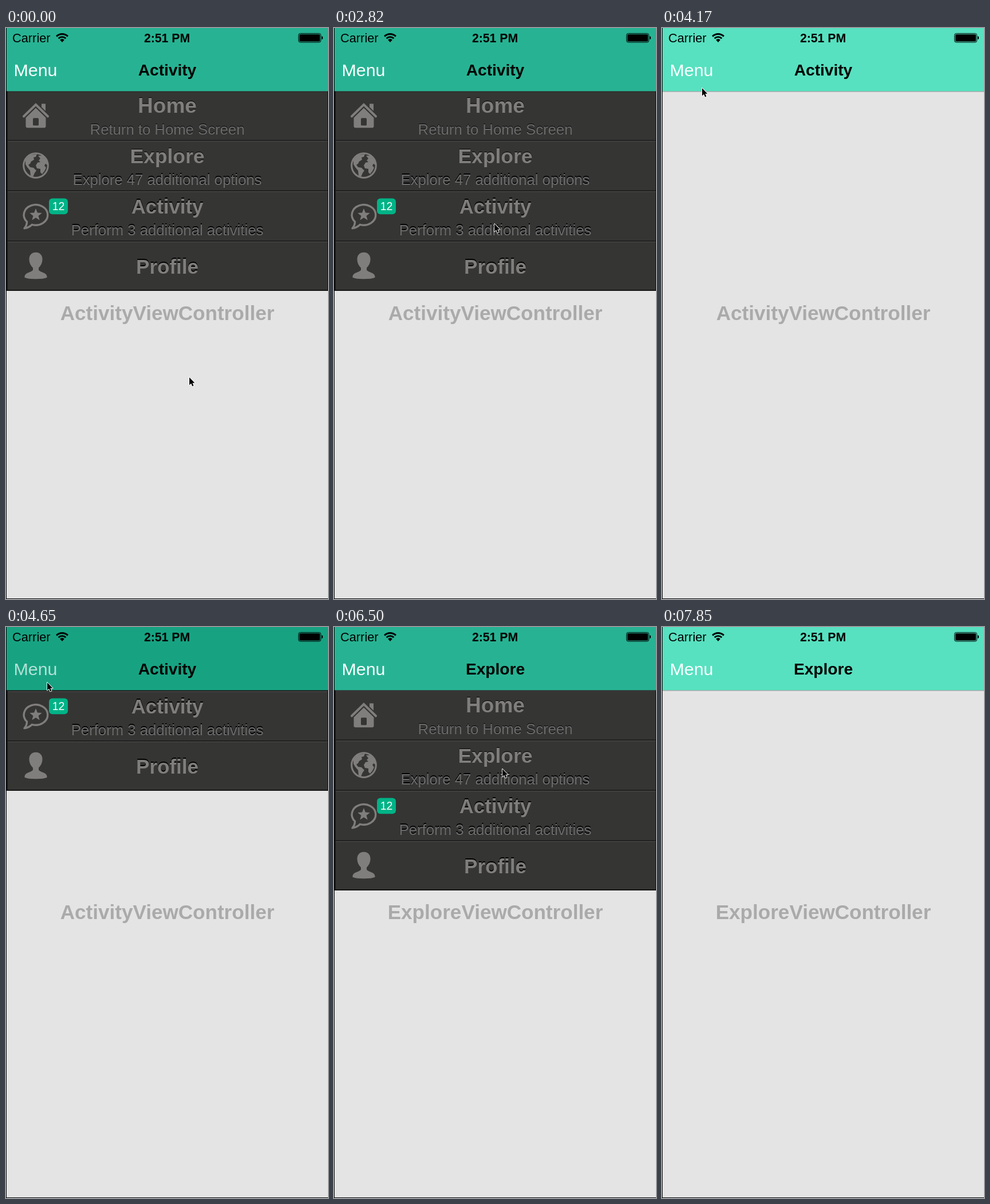
An HTML page with a canvas for the animation above (8270 ms loop, 562 by 997 pixels).

```html
<!DOCTYPE html>
<html lang="en">
<head>
<meta charset="utf-8">
<title>Drop-down menu</title>
<style>
  html, body { margin: 0; width: 100%; height: 100%; overflow: hidden; background: #e4e4e4; }
  canvas { display: block; }
</style>
</head>
<body>
<canvas id="stage" width="562" height="997"></canvas>
<script>
const ctx = document.getElementById('stage').getContext('2d');
const W = 562, H = 997, LOOP = 8270, STEP = 60;
const SANS = '"Liberation Sans", Arial, sans-serif';
const MID = 281.5, NAV = 110.4;
const ROW = 87.8, FIRST = 109.5, BOTTOM = 459;
const HIDDEN = -460, BOUNCE = 36;
const INK = '#807e7c', SLATE = '#353534', DARK = '#1c1c1b';

const BAR_OPEN = [39, 179, 147], BAR_FULL = [23, 163, 130], BAR_CLEAR = [87, 225, 192];

const rows = [
  { title: 'Home', size: 37, sub: 'Return to Home Screen', icon: drawHome },
  { title: 'Explore', size: 35.5, sub: 'Explore 47 additional options', icon: drawGlobe },
  { title: 'Activity', size: 34.8, sub: 'Perform 3 additional activities', icon: drawChat, badge: '12' },
  { title: 'Profile', size: 35, icon: drawPerson }
];

// Pointer stops: time, x, y
const stops = [
  [780, 320, 610], [1620, 279, 344], [1680, 280, 342],
  [3510, 280, 342], [4170, 70, 105], [4290, 71, 94],
  [4590, 71, 94], [4650, 72, 97], [5060, 256, 248],
  [5180, 256, 248], [5360, 270, 262],
  [5480, 270, 262], [5720, 294, 248],
  [7310, 294, 248], [7670, 495, 960]
];
const POINTER_GONE = 7850;

const clamp = v => Math.min(1, Math.max(0, v));
const ease = v => { v = clamp(v); return v * v * (3 - 2 * v); };
const mix = (a, b, v) => a + (b - a) * v;
const snap = (t, from) => from + Math.floor((t - from) / STEP) * STEP;

function rect(x, y, w, h, color) {
  ctx.fillStyle = color;
  ctx.fillRect(x, y, w, h);
}

function roundRect(x, y, w, h, r) {
  ctx.beginPath();
  ctx.roundRect(x, y, w, h, r);
}

function text(str, x, y, size, color, bold, align = 'center') {
  ctx.font = `${bold ? 'bold ' : ''}${size}px ${SANS}`;
  ctx.textAlign = align;
  ctx.fillStyle = color;
  ctx.fillText(str, x, y);
}

function etched(str, y, size, color, bold) {
  text(str, MID, y - 1.5, size, '#000', bold);
  text(str, MID, y, size, color, bold);
}

function fillPath(d, color = INK) {
  ctx.fillStyle = color;
  ctx.fill(new Path2D(d));
}

function drawHome() {
  fillPath('M10-20h7V-6h-7Z');
  fillPath('M-17.5 4L0-13 17.5 4V19q0 3-3 3h-29q-3 0-3-3Z');
  ctx.lineJoin = 'miter';
  ctx.lineCap = 'round';
  for (const [width, color] of [[8, SLATE], [4, INK]]) {
    ctx.lineWidth = width;
    ctx.strokeStyle = color;
    ctx.stroke(new Path2D('M-21 2L0-18.5 21 2'));
  }
  roundRect(-5, 5, 10, 13, 1.5);
  ctx.fillStyle = SLATE;
  ctx.fill();
}

function drawGlobe() {
  ctx.lineWidth = 3;
  ctx.strokeStyle = INK;
  ctx.beginPath();
  ctx.arc(0, 0, 21.3, 0, Math.PI * 2);
  ctx.stroke();
  fillPath('M-18-10L-11-18 2-20 0-15-4-14-3-10-8-7-10-3-13-1-10 3-4 4 1 9-2 13-5 20-9 18-10 9-15 3-18-2Z');
  fillPath('M4-17L12-17 19-9 21 0 17-3 15 0 18 4 15 10 11 15 8 12 8 6 2 5 0 0 3-5 8-6 5-9 8-12Z');
}

function drawChat() {
  ctx.lineWidth = 3.4;
  ctx.lineJoin = 'round';
  ctx.strokeStyle = INK;
  ctx.stroke(new Path2D(
    'M-15.5 10.4A20.8 17.8 0 1 1-6.5 15.4Q-12 21-20 22Q-15.5 17-15.5 10.4Z'));
  ctx.beginPath();
  for (let i = 0; i < 10; i++) {
    const r = i % 2 ? 4.8 : 11.3, a = i * Math.PI / 5 - Math.PI / 2;
    ctx.lineTo(r * Math.cos(a), r * Math.sin(a) - 1.5);
  }
  ctx.fillStyle = INK;
  ctx.fill();
}

function drawPerson() {
  fillPath('M0-24C8-24 12-18 11.5-11C11-4 8 0 5 3V7C8 11 19 11 19.5 18V20Q14 22.5 0 22.5' +
    'T-19.5 20V18C-19 11-8 11-5 7V3C-8 0-11-4-11.5-11C-12-18-8-24 0-24Z');
}

function drawRow(row, y, lit) {
  rect(1, y - 1.75, W - 1, 1.75, DARK);
  rect(1, y, W - 1, 1.2, '#4b4b49');
  if (lit) rect(3, y, 558, ROW - 1.75, DARK);
  etched(row.title, y + (row.sub ? 38.7 : 55.8), row.size, INK, true);
  if (row.sub) etched(row.sub, y + 76.6, 25.7, lit ? '#636363' : '#6c6c6c');
  ctx.save();
  ctx.translate(52, y + 42.8);
  row.icon();
  ctx.restore();
  if (row.badge) {
    roundRect(75, y + 12.3, 33, 27.8, 6);
    ctx.fillStyle = '#00b386';
    ctx.fill();
    text(row.badge, 91.5, y + 32.8, 19.5, '#fff');
  }
}

function drawMenu(offset, lit) {
  const top = 60 + offset, end = BOTTOM + offset;
  if (end <= NAV) return;
  rect(1, top, W - 1, end - top, SLATE);
  rows.forEach((row, i) => drawRow(row, FIRST + i * ROW + offset, i === lit));
  rect(1, top, 1.75, end - top, '#111');
  rect(561, top, 1, end - top, '#111');
  rect(1, end - 1.75, W - 1, 1.75, '#111');
}

function barColor(offset) {
  const under = clamp(-offset / 80);
  const away = clamp((NAV - BOTTOM - offset) / NAV);
  const c = BAR_OPEN.map((v, i) => Math.round(mix(mix(v, BAR_FULL[i], under), BAR_CLEAR[i], away)));
  return `rgb(${c})`;
}

function drawStatus() {
  text('Carrier', 11, 25, 21.8, '#000', false, 'left');
  text('2:51 PM', 281, 25, 21.2, '#000', true);

  const a = -Math.PI * 0.75, b = -Math.PI * 0.25;
  ctx.strokeStyle = ctx.fillStyle = '#000';
  ctx.lineCap = 'butt';
  ctx.lineWidth = 2.9;
  for (const r of [14, 8.9]) {
    ctx.beginPath();
    ctx.arc(98, 24.5, r, a, b);
    ctx.stroke();
  }
  ctx.beginPath();
  ctx.moveTo(98, 25);
  ctx.arc(98, 24.5, 5.4, a, b);
  ctx.fill();

  ctx.lineWidth = 1;
  roundRect(510.5, 9.5, 39, 15.5, 3);
  ctx.stroke();
  roundRect(512, 11, 36, 12.5, 1.5);
  ctx.fill();
  roundRect(551, 14.3, 2, 5.8, [0, 2, 2, 0]);
  ctx.fill();
}

function drawBar(offset, title, alpha) {
  rect(0, 0, W, NAV, barColor(offset));
  rect(0, NAV, W, 1.2, 'rgba(0,0,0,0.3)');
  drawStatus();
  text('Menu', 13.5, 83.5, 30.4, `rgba(255,255,255,${alpha})`, false, 'left');
  text(title, MID, 83, 28.1, '#000', true);
}

function drawPointer(x, y) {
  ctx.save();
  ctx.translate(x, y);
  const arrow = new Path2D('M0 0V13.4L3.1 10.6 5.2 15.4 7.4 14.4 5.4 9.8H9.4Z');
  ctx.lineWidth = 1.8;
  ctx.lineJoin = 'round';
  ctx.strokeStyle = '#fff';
  ctx.stroke(arrow);
  ctx.fillStyle = '#000';
  ctx.fill(arrow);
  ctx.restore();
}

function closing(t, start) {
  return t < start + 200
    ? BOUNCE * ease((t - start) / 200)
    : mix(BOUNCE, HIDDEN, ease((t - start - 200) / 300));
}

function menuOffset(t) {
  if (t < 2820) return 0;
  if (t < 4410) return closing(snap(t, 2820), 2830);
  if (t < 6500) return mix(HIDDEN, 0, ease((snap(t, 4410) - 4475) / 300));
  return closing(snap(t, 6500), 6480);
}

function litRow(t) {
  if (t >= 2220 && t < 2820) return 2;
  if (t >= 6080 && t < 6500) return 1;
  return -1;
}

function menuAlpha(t) {
  return t < 4410 ? 1 : mix(0.2, 1, clamp((snap(t, 4410) - 4470) / 300));
}

function pointerAt(t) {
  const next = stops.findIndex(s => s[0] > t);
  if (next === 0) return stops[0].slice(1);
  if (next < 0) return stops[stops.length - 1].slice(1);
  const [t0, x0, y0] = stops[next - 1], [t1, x1, y1] = stops[next];
  const v = ease((snap(t, t0) - t0) / (t1 - t0));
  return [mix(x0, x1, v), mix(y0, y1, v)];
}

function draw(t) {
  const page = t < 6500 ? 'Activity' : 'Explore';
  const offset = Math.round(menuOffset(t));
  rect(0, 0, W, H, '#e4e4e4');
  text(page + 'ViewController', MID, 510, 35.1, '#aaa', true);
  drawMenu(offset, litRow(t));
  drawBar(offset, page, menuAlpha(t));
  rect(0, 0, 1, H, '#000');
  rect(0, H - 1, W, 1, '#000');
  if (t < POINTER_GONE) drawPointer(...pointerAt(t));
}

const began = performance.now();
function tick() {
  draw((performance.now() - began) % LOOP);
  requestAnimationFrame(tick);
}
tick();
</script>
</body>
</html>
```
